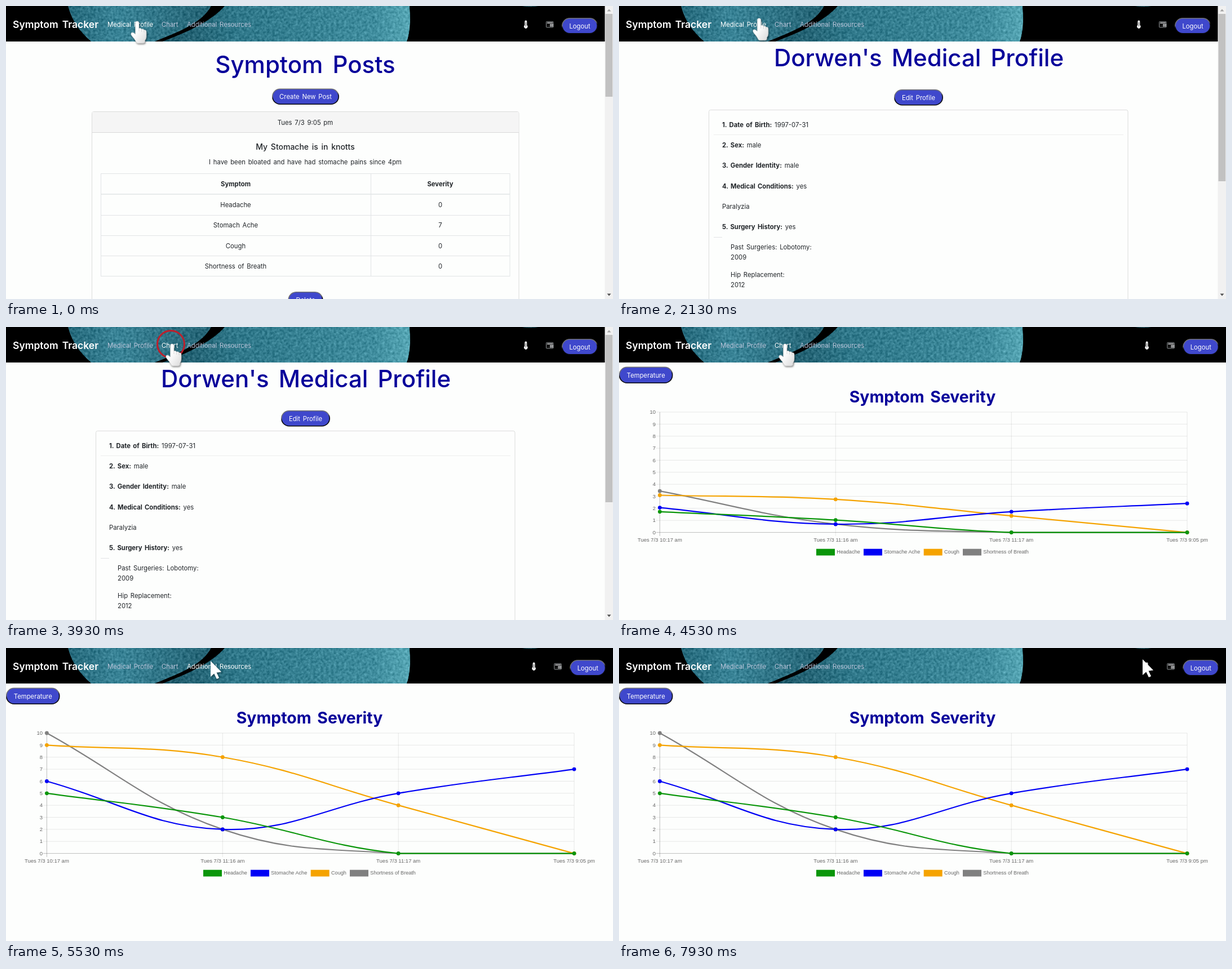
An HTML page for the animation above (8000 ms loop, 1077 by 520 pixels).

```html
<!DOCTYPE html>
<html lang="en">
<head>
<meta charset="utf-8">
<title>Symptom Tracker</title>
<style>
html, body { margin: 0; width: 100%; height: 100%; overflow: hidden; background: #fdfefd; }
svg { display: block; }
text { font-family: Inter, sans-serif; fill: #212529; word-spacing: .14em; white-space: pre; }
.mid { text-anchor: middle; }
.end { text-anchor: end; }
.title { fill: #06009a; font-weight: 500; }
.strong { font-weight: 700; }
.head { font-weight: 500; }
.brand { font-weight: 600; }
.light { fill: #fff; }
.link { fill: #b9c3d8; }
.link.on { fill: #fff; }
.axis { font-family: "Liberation Sans", Arial, sans-serif; fill: #666; word-spacing: 0; }
.btn { fill: #3f48cc; stroke: url(#bevel); stroke-width: 1.6; }
.line { fill: none; stroke: #e2e4e6; }
</style>
</head>
<body>
<svg id="stage" width="1077" height="520" viewBox="0 0 1077 520"></svg>
<script>
const LOOP = 8000;
const BODY = 11.3;
const text = (x, y, s, size = BODY, cls = '') =>
  `<text x="${x}" y="${y}" font-size="${size}" class="${cls}">${s}</text>`;
const rect = (x, y, w, h, attrs) => `<rect x="${x}" y="${y}" width="${w}" height="${h}" ${attrs}/>`;
const path = (d, attrs = 'class="line"') => `<path d="${d}" ${attrs}/>`;
const button = (x, y, w, label, h = 28.5) =>
  rect(x + .8, y + .8, w - 1.6, h - 1.6, 'rx="13.4" class="btn"') +
  text(x + w / 2, y + h / 2 + 4.3, label, BODY, 'mid light');
const group = (id, body) => `<g id="${id}">${body}</g>`;

const defs = `<defs>
  <linearGradient id="bevel" x2=".25" y2="1"><stop offset=".45" stop-color="#6f7076"/><stop offset=".6" stop-color="#08080c"/></linearGradient>
  <linearGradient id="cellA"><stop stop-color="#25687a"/><stop offset=".35" stop-color="#3a8497"/><stop offset="1" stop-color="#246273"/></linearGradient>
  <linearGradient id="cellB"><stop stop-color="#1d5565"/><stop offset=".3" stop-color="#2f7789"/><stop offset=".85" stop-color="#3f8c9d"/><stop offset="1" stop-color="#56a6b4"/></linearGradient>
  <linearGradient id="skin" x2="1" y2="1"><stop offset=".4" stop-color="#fff"/><stop offset="1" stop-color="#d9d9d9"/></linearGradient>
  <clipPath id="bar"><path d="M0 0H1077V63H0z"/></clipPath>
  <filter id="grain" x="0" y="0" width="1" height="1" color-interpolation-filters="sRGB">
    <feTurbulence type="fractalNoise" baseFrequency=".22" numOctaves="2" seed="4"/>
    <feColorMatrix values="1 0 0 0 0 1 0 0 0 0 1 0 0 0 0 0 0 0 0 1"/>
    <feComposite in="SourceGraphic" operator="arithmetic" k2="1" k3=".3" k4="-.15"/>
    <feComposite in2="SourceAlpha" operator="in"/>
  </filter>
  <filter id="shadow" x="-50%" y="-50%" width="200%" height="200%"><feDropShadow dx="1" dy="1.5" stdDeviation="1.6" flood-opacity=".55"/></filter>
</defs>`;

// Header
const links = [
  { label: 'Medical Profile', x: 180, end: 261 },
  { label: 'Chart', x: 276, end: 306 },
  { label: 'Additional Resources', x: 321, end: 438 }
];
const icons =
  path('M920.3 27.5a2 2 0 0 1 4 0V34a3.2 3.2 0 1 1-4 0z', 'fill="#f4f4f4"') +
  path('M922.3 29V36', 'stroke="#555" stroke-width="1"') +
  rect(958.5, 27.5, 12.5, 10.5, 'rx="1" fill="#111" stroke="#8b8f92"') +
  path('M960 30H970M965 33H971M965 35.5H971', 'stroke="#e6e8ea" stroke-width="1.4"');
const header = rect(0, 0, 1077, 63, 'fill="#000"') +
  `<g clip-path="url(#bar)"><g filter="url(#grain)">` +
  path('M110 0C116 25 130 45 152 64H262C300 48 348 32 364 0z', 'fill="url(#cellA)"') +
  path('M388 0C368 22 335 42 274 64H711C718 45 718 20 716 0z', 'fill="url(#cellB)"') +
  path('M914 0Q930 3 946 0z', 'fill="#1d4f5b"') + '</g></g>' +
  text(12, 38.5, 'Symptom Tracker', 17.5, 'brand light') +
  links.map(l => text(l.x, 36.6, l.label, BODY, 'link')).join('') +
  group('tools', icons + button(986, 21, 64, 'Logout'));

// Posts
const rows = [['Headache', 0], ['Stomach Ache', 7], ['Cough', 0], ['Shortness of Breath', 0]];
const posts = text(531, 118.5, 'Symptom Posts', 42, 'mid title') +
  button(472, 146.5, 119, 'Create New Post') +
  rect(152.5, 187.5, 757.5, 360, 'rx="3" class="line" style="stroke:#dcdcdc"') +
  rect(153, 188, 756.5, 36, 'fill="#f5f5f5"') +
  path('M153 224.5H910', 'class="line" style="stroke:#d9d9d9"') +
  text(531, 210.8, 'Tues 7/3 9:05 pm', BODY, 'mid') +
  text(531, 254.8, 'My Stomache is in knotts', 14, 'mid head') +
  text(531, 280.8, 'I have been bloated and have had stomache pains since 4pm', BODY, 'mid') +
  rect(168.5, 297.5, 725.5, 182, 'class="line"') +
  path('M647.5 297V479M168 371.5H894M168 407.5H894M168 443.5H894') +
  path('M168 334H894', 'class="line" stroke-width="1.6"') +
  text(407.5, 320.3, 'Symptom', BODY, 'mid strong') + text(770.5, 320.3, 'Severity', BODY, 'mid strong') +
  rows.map(([name, n], i) => text(407.5, 357.2 + 36.2 * i, name, BODY, 'mid') +
    text(770.5, 357.2 + 36.2 * i, n, BODY, 'mid')).join('') +
  button(500.5, 507, 62, 'Delete');

// Medical profile
const owner = "Dorwen's Medical Profile";
const answers = [
  ['1. Date of Birth:', '1997-07-31', 211], ['2. Sex:', 'male', 247], ['3. Gender Identity:', 'male', 283],
  ['4. Medical Conditions:', 'yes', 320], ['', 'Paralyzia', 356], ['5. Surgery History:', 'yes', 392]
];
const surgeries = [['Past Surgeries: Lobotomy:', 428], ['2009', 446], ['Hip Replacement:', 477], ['2012', 495]];
const loading = text(539, 106.5, owner, 42, 'mid title') + text(538.5, 182, 'Loading...', 22.4, 'mid head');
const profile = text(532, 106.5, owner, 42, 'mid title') +
  button(488, 148, 87, 'Edit Profile') +
  rect(159.5, 184.5, 743.5, 400, 'rx="3" class="line" style="stroke:#dcdcdc"') +
  path('M168 228.5H895', 'class="line" style="stroke:#eee"') + path('M168 410.5H183') +
  answers.map(([q, a, y]) =>
    text(183, y + 4.2, (q && `<tspan class="strong">${q}</tspan> `) + a)).join('') +
  surgeries.map(([s, y]) => text(198, y + 4.2, s)).join('');

// Chart
const TOP = 151, BASE = 364.6, LEFT = 72.4, STEP = 311.9;
const px = i => LEFT + STEP * i;
const py = v => BASE - v * (BASE - TOP) / 10;
const series = [
  { name: 'Headache', color: '#0a960a', data: [5, 3, 0, 0], x: 350 },
  { name: 'Stomache Ache', color: '#0000f5', data: [6, 2, 5, 7], x: 434 },
  { name: 'Cough', color: '#f5a300', data: [9, 8, 4, 0], x: 540.7 },
  { name: 'Shortness of Breath', color: '#808080', data: [10, 2, 0, 0], x: 610 }
];
const times = ['10:17 am', '11:16 am', '11:17 am', '9:05 pm'];
const ticks = [...Array(11).keys()];
const grid = ticks.map(v => path(`M66 ${py(v)}H1008`, `stroke="#000" stroke-opacity="${v ? .09 : .25}"`) +
    text(65, py(v) + 3.2, v, 9.5, 'axis end')).join('') +
  times.map((s, i) => path(`M${px(i)} ${TOP}V371`, `stroke="#000" stroke-opacity="${i ? .09 : .25}"`) +
    text(px(i), 380.5, 'Tues 7/3 ' + s, 9.5, 'axis mid')).join('') +
  series.map(s => rect(s.x, 393.7, 33, 11.8, `fill="${s.color}"`) +
    text(s.x + 36.3, 402.3, s.name, 9.15, 'axis')).join('');
const chart = button(0, 70.5, 95.5, 'Temperature', 29.5) +
  text(538.5, 133.5, 'Symptom Severity', 28.4, 'mid title strong') + grid + group('plot', '');

// Spline with tension .4, handles kept inside the plot area
function handles(p, i) {
  const a = p[i - 1] || p[i], b = p[i], c = p[i + 1] || p[i];
  const d1 = Math.hypot(b[0] - a[0], b[1] - a[1]), d2 = Math.hypot(c[0] - b[0], c[1] - b[1]);
  const at = k => [b[0] + k * (c[0] - a[0]),
    Math.min(BASE, Math.max(TOP, b[1] + k * (c[1] - a[1])))];
  return [at(-.4 * d1 / (d1 + d2)), at(.4 * d2 / (d1 + d2))];
}
function curve({ data, color }, grow) {
  const p = data.map((v, i) => [px(i), py(v)]);
  const put = ([x, y]) => x.toFixed(2) + ' ' + (BASE + (y - BASE) * grow).toFixed(2);
  let d = 'M' + put(p[0]);
  for (let i = 1; i < p.length; i++)
    d += `C${put(handles(p, i - 1)[1])} ${put(handles(p, i)[0])} ${put(p[i])}`;
  return path(d, `fill="none" stroke="${color}" stroke-width="2.2"`) +
    p.map(q => `<circle cx="${q[0]}" cy="${BASE + (q[1] - BASE) * grow}" r="3.4" fill="${color}"/>`).join('');
}

const scrollbar = rect(1062.5, 0, 14.5, 520, 'fill="#f1f1f1"') +
  '<rect id="thumb" x="1063.5" y="14" width="12.7" fill="#c1c1c1"/>' +
  path('M1066.5 9.5L1070 5.5L1073.5 9.5z', 'fill="#a3a3a3"') +
  path('M1066.5 510.5L1070 514.5L1073.5 510.5z', 'fill="#505050"');
const arrow = path('M0 0V28L6.3 22.3L11 32L15 30L10.5 20.5L19 19.5z', 'id="arrow" fill="#fff"');
const hand = path('M-2.5 2.2A3.2 3.2 0 0 1 3.9 2.2V11.5Q7.5 10.5 8.5 13Q12 12 13 14.6Q17 14 17 18V26' +
  'Q17 30 14.5 33V35Q14.5 38 11 38H2Q-.5 38-1.5 35Q-4 30-8 26Q-11.5 22-9.5 19.5Q-7 17.5-2.5 22z' +
  'M3.9 11.5V17M8.5 13V18M13 14.6V19', 'id="hand" fill="url(#skin)" stroke="#bbb" stroke-width=".5"');

const stage = document.getElementById('stage');
stage.innerHTML = defs + header + group('posts', posts) + group('loading', loading) +
  group('profile', profile) + group('chart', chart) + group('scroll', scrollbar) +
  '<circle id="ring" fill="none" stroke="#bd1f2c"/>' +
  `<g id="cursor" filter="url(#shadow)">${arrow}${hand}</g>`;

const el = id => document.getElementById(id);
const show = (id, on) => el(id).setAttribute('display', on ? 'inline' : 'none');
const linkNodes = [...stage.querySelectorAll('.link')];

// Time, x, y of the pointer tip
const route = [
  [0, 232, 28], [1930, 232, 28], [2530, 293, 8], [2930, 294, 31], [5130, 294, 31], [5330, 313, 27],
  [5530, 363, 23], [5730, 378, 29], [6530, 378, 29], [7530, 929, 20], [LOOP, 929, 20]
];
const clicks = [1330, 3930];

function pointer(t) {
  const i = Math.max(1, route.findIndex(k => k[0] >= t));
  const [t0, x0, y0] = route[i - 1], [t1, x1, y1] = route[i];
  let k = Math.max(0, (t - t0) / (t1 - t0));
  k = k * k * (3 - 2 * k);
  return [x0 + (x1 - x0) * k, y0 + (y1 - y0) * k];
}
const hovered = ([x, y]) => y < 20 || y > 45 ? -1 : links.findIndex(l => x >= l.x && x <= l.end);

function draw(t) {
  const page = t < 1530 ? 'posts' : t < 1930 ? 'loading' : t < 4530 ? 'profile' : 'chart';
  for (const id of ['posts', 'loading', 'profile', 'chart']) show(id, id === page);
  const scrolls = page === 'posts' || page === 'profile';
  show('scroll', scrolls);
  el('thumb').setAttribute('height', page === 'posts' ? 147 : 297);
  el('tools').setAttribute('transform', `translate(${scrolls ? 0 : 14.3})`);

  if (page === 'chart') {
    const left = Math.max(0, 1 - (t - 4430) / 1000);
    el('plot').innerHTML = [...series].reverse().map(s => curve(s, 1 - left ** 4)).join('');
  }

  const tip = pointer(t), over = hovered(tip);
  linkNodes.forEach((n, i) => n.classList.toggle('on', i === over));
  // The pointer shape reacts one step after the link does
  const grab = over >= 0 && hovered(pointer(t - 200)) >= 0;
  show('hand', grab);
  show('arrow', !grab);
  el('cursor').setAttribute('transform', `translate(${tip})`);

  const age = clicks.map(c => t - c).find(a => a >= 0 && a < 400);
  show('ring', age !== undefined);
  if (age !== undefined) {
    const late = age >= 200, ring = el('ring');
    ring.setAttribute('cx', tip[0] - 1.5);
    ring.setAttribute('cy', tip[1] - .5);
    ring.setAttribute('r', late ? 20.5 : 24);
    ring.setAttribute('stroke-width', late ? 2 : 3);
  }
}

let last = -1;
const start = performance.now();
function tick() {
  const t = (performance.now() - start) % LOOP;
  const step = t < 530 ? 0 : 530 + Math.floor((t - 530) / 200) * 200;
  if (step !== last) draw(last = step);
  requestAnimationFrame(tick);
}
tick();
</script>
</body>
</html>
```
